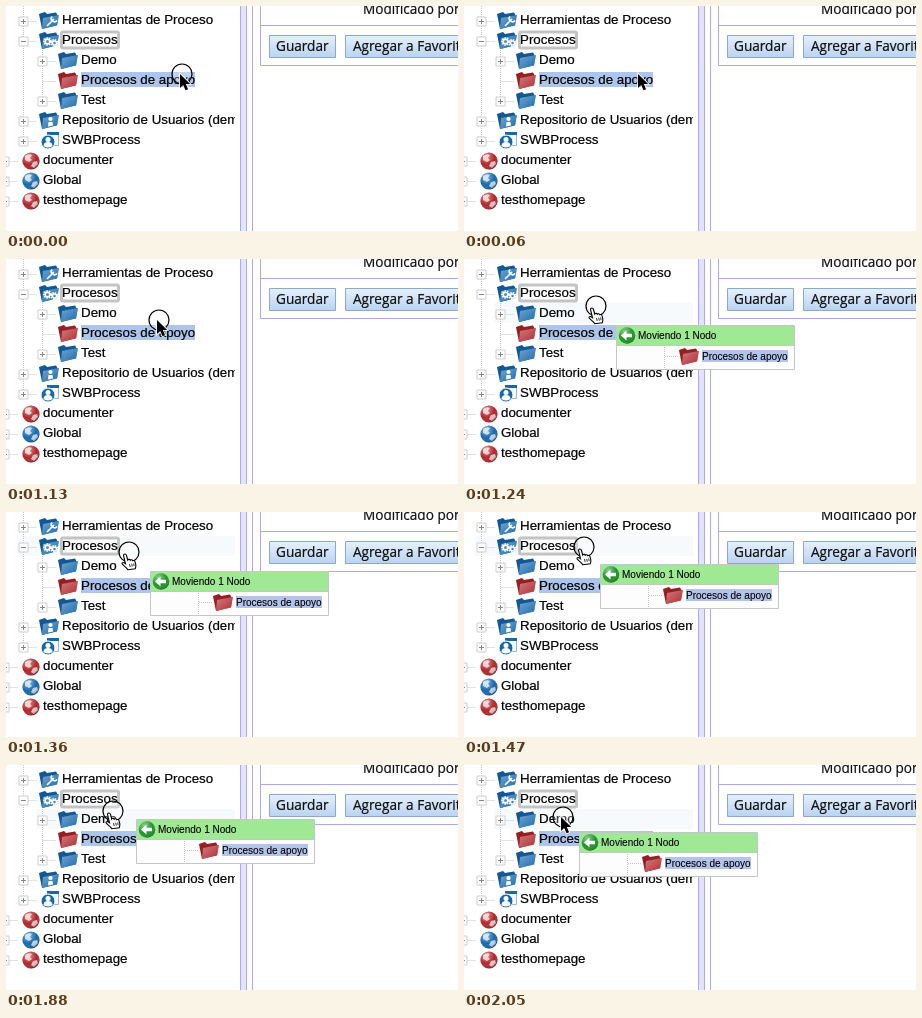
These frames come from a looping animation (452x225 px, 2.88 s). An HTML page:

```html
<!DOCTYPE html>
<html lang="es">
<head>
<meta charset="utf-8">
<title>Mover un nodo</title>
<style>
  html, body { margin: 0; width: 100%; height: 100%; overflow: hidden; background: #fff; }
  svg { display: block; }
  text {
    font: 13.33px "Liberation Sans", Arial, sans-serif;
    fill: #000; stroke: #000; stroke-width: .2; white-space: pre;
  }
  .form text { font: 13.6px "Open Sans", "Noto Sans", sans-serif; fill: #111; }
  .panel text { font-size: 10px; stroke-width: .1; }
  .rule { fill: none; stroke: #a9a9f6; }
  .dots { fill: none; stroke: #c4c4c4; stroke-dasharray: 1 1; }
  .blue { color: #1668ad; }
  .red { color: #b0262b; }
  .mark { fill: none; stroke: #fff; stroke-width: 1.6; }
</style>
</head>
<body>
<svg width="452" height="225" viewBox="0 0 452 225">
  <defs>
    <linearGradient id="face" x2="1" y2="1">
      <stop stop-color="#fff" stop-opacity=".4"/>
      <stop offset="1" stop-color="#fff" stop-opacity=".03"/>
    </linearGradient>
    <radialGradient id="shine" cx=".35" cy=".25" r=".8">
      <stop stop-color="#fff" stop-opacity=".5"/>
      <stop offset=".6" stop-color="#fff" stop-opacity="0"/>
      <stop offset="1" stop-opacity=".3"/>
    </radialGradient>
    <linearGradient id="button" x2="0" y2="1">
      <stop stop-color="#e6f0fc"/>
      <stop offset="1" stop-color="#bad3f0"/>
    </linearGradient>
    <clipPath id="tree"><path d="M0 0H229V225H0z"/></clipPath>

    <g id="folder">
      <path d="M0 3 6 1 8 3 17 1.500 19 5 18 14 3 18z" fill="currentColor"/>
      <path d="M0 3 6 1 8 3 17 1.500 19 5 18 14 3 18z" fill-opacity=".15"/>
      <path d="M4 7 20 4 18 14.500 3 18z" fill="currentColor"/>
      <path d="M4 7 20 4 18 14.500 3 18z" fill="url(#face)"/>
    </g>
    <g id="tool">
      <use href="#folder"/>
      <path class="mark" d="M8 15 15 8M13 5.500a3 3 0 1 0 5 4"/>
    </g>
    <g id="gears">
      <use href="#folder"/>
      <g class="mark" stroke-dasharray="1.500 1"><circle cx="8.500" cy="10.500" r="3.500"/><circle cx="15.500" cy="12" r="3.200"/></g>
      <g class="mark"><circle cx="8.500" cy="10.500" r="2.300"/><circle cx="15.500" cy="12" r="2"/></g>
    </g>
    <g id="users">
      <use href="#folder"/>
      <circle cx="11.500" cy="8" r="2.100" fill="#fff"/>
      <path d="M9 15.500 9.500 11h4l.5 3.500z" fill="#fff"/>
    </g>
    <g id="process">
      <path d="M8.500 1.500h11v13h-11z" fill="#f5f8fc" stroke="#9bb4cf"/>
      <path d="M8 1h12v3H8z" fill="currentColor"/>
      <circle cx="9" cy="11" r="7" fill="currentColor" stroke="#fff"/>
      <circle cx="9" cy="8.500" r="2.500" fill="#fff"/>
      <path d="M4.500 15q0-4 4.500-4t4.500 4q-4.500 3-9 0z" fill="#fff"/>
    </g>
    <g id="globe" transform="translate(1 1)">
      <circle cx="10" cy="9" r="8.600" fill="currentColor"/>
      <path d="M4 4q4-3 7-1l-2 3 2 2-3 2-4-2zM12 10l4-1 1 3-4 4-3-2z" fill="#fff" fill-opacity=".7"/>
      <circle cx="10" cy="9" r="8.600" fill="url(#shine)"/>
    </g>
    <path id="box" d="M-4.500-4.500h9v9h-9z" fill="#fdfdfd" stroke="#cfcfcf"/>
  </defs>

  <rect width="452" height="225" fill="#fff"/>
  <g clip-path="url(#tree)">
    <rect id="hover" height="20" fill="#f7fafd"/>
    <path class="dots" d="M17.500 0V134M36.500 44V94M-1.500 134V194"/>
    <rect x="55.500" y="26" width="57" height="16" rx="1.500" fill="#fff" stroke="#c4c4c4" stroke-width="3"/>
    <rect x="75" y="66" width="114" height="15" fill="#adc5ea"/>
    <g id="rows"></g>
  </g>

  <rect x="234" width="7" height="225" fill="#e1e4fa"/>
  <path class="rule" d="M234.500 0V225M240.500 0V225M246.500 0V225M254.500 0V59.500H452M254.500 19.500H452"/>
  <g class="form">
    <text x="357" y="8">Modificado por</text>
    <g fill="url(#button)" stroke="#8ba9cc">
      <path d="M263.500 29.500h66v22h-66zM339.500 29.500h130v22h-130z"/>
    </g>
    <text x="270" y="45">Guardar</text>
    <text x="347" y="45">Agregar a Favoritos</text>
  </g>

  <g id="panel" class="panel">
    <path d="M.5.5h178v44H.5z" fill="#fdfdfe" stroke="#c3c6ca"/>
    <path d="M1 1h177v19H1z" fill="#a0e994"/>
    <path d="M1 20.500h177" stroke="#bccdb9"/>
    <circle cx="11" cy="10.500" r="8.300" fill="#1f9428"/>
    <circle cx="11" cy="10.500" r="8.300" fill="url(#shine)"/>
    <path d="M5 10.500l5.500-5v3.300H16v3.400h-5.500v3.300z" fill="#fff"/>
    <text x="22" y="14">Moviendo 1 Nodo</text>
    <path class="dots" d="M48.500 22V44M49 31.500H62"/>
    <use href="#folder" class="red" x="63" y="22"/>
    <rect x="86" y="25" width="86" height="12" fill="#b3c3ea"/>
    <text x="86" y="34.500">Procesos de apoyo</text>
  </g>

  <g id="pointer">
    <circle id="ring" r="10" fill="#fff" fill-opacity=".25" stroke="#000" stroke-width="1.200"/>
    <path id="arrow" d="M-2 0v14l3.200-3 2.300 5.300 2.600-1.100-2.300-5.200h4.400z" stroke="#fff" paint-order="stroke" stroke-width="1.600"/>
    <g id="hand" transform="translate(-1 .5)">
      <path d="M-4.500 3c0-2 2.500-2 3 0l1.200 4.500c.6-1 2.200-.8 2.600.2c.7-.8 2.200-.5 2.500.5c.8-.6 2 0 2.200 1l.8 3c.3 1.500-.2 2.500-.5 4l-7.500 1c-1-2-4-3.500-5.500-5.500c-1-1.500.8-2.300 2.200-1.200l1 .7z" fill="#fff" stroke="#000" stroke-width="1.100"/>
      <path d="M1.500 11.500l.7 3M3.700 11.200l.6 3M5.700 11l.4 2.600" stroke="#000" stroke-width=".8"/>
    </g>
  </g>
</svg>
<script>
  const el = id => document.getElementById(id);
  const LOOP = 2880;

  // label, level, icon, colour, expander sign
  const rows = [
    ["Herramientas de Proceso", 1, "tool", "blue", "+"],
    ["Procesos", 1, "gears", "blue", "-"],
    ["Demo", 2, "folder", "blue", "+"],
    ["Procesos de apoyo", 2, "folder", "red", ""],
    ["Test", 2, "folder", "blue", "+"],
    ["Repositorio de Usuarios (demo)", 1, "users", "blue", "+"],
    ["SWBProcess", 1, "process", "blue", "+"],
    ["documenter", 0, "globe", "red", "+"],
    ["Global", 0, "globe", "blue", "+"],
    ["testhomepage", 0, "globe", "red", "+"]
  ];
  el("rows").innerHTML = rows.map(([label, level, icon, colour, sign], i) => {
    const mid = 14 + 20 * i, x = 19 * level - 1.500, y = mid + 1.500;
    const box = sign && `<use href="#box" x="${x}" y="${y}"/>`;
    const signs = { "+": "M-2.500 0h5M0-2.500v5", "-": "M-2.500 0h5", "": "" };
    return `<path class="dots" d="M${x} ${y}h14"/>${box}
      <path d="${signs[sign]}" transform="translate(${x} ${y})" stroke="#888"/>
      <use href="#${icon}" class="${colour}" x="${x + 15.500}" y="${mid - 9}"/>
      <text x="${37 + 19 * level}" y="${mid + 4}">${label}</text>`;
  }).join("");

  // start time, pointer x, pointer y
  const steps = [
    [0, 176, 68], [60, 176, 68], [1020, 173, 68], [1070, 166, 66],
    [1130, 153, 61], [1180, 136, 51], [1240, 132, 47], [1300, 128, 44],
    [1360, 123, 40], [1410, 120, 37], [1470, 120, 35], [1530, 117, 34],
    [1580, 117, 34], [1760, 117, 34], [1820, 114, 39], [1880, 107, 46],
    [1990, 99, 52], [2050, 99, 52]
  ];
  const show = (id, on) => el(id).setAttribute("visibility", on ? "visible" : "hidden");
  const move = (id, x, y) => el(id).setAttribute("transform", `translate(${x} ${y})`);

  function draw(now) {
    const t = now % LOOP;
    const i = steps.findLastIndex(step => step[0] <= t);
    const [, x, y] = steps[i];
    // the dragged panel trails the pointer by one step
    const [, lastX, lastY] = steps[Math.max(0, i - 1)];
    const dragging = t >= 1180;
    const hand = dragging && t < 1990;

    move("pointer", x, y);
    move("panel", lastX + 16, lastY + 15);
    show("ring", t < 60 || t >= 1020);
    show("panel", dragging);
    show("hand", hand);
    show("arrow", !hand);

    const onParent = y < 43, left = onParent ? 11 : 30;
    show("hover", dragging);
    el("hover").setAttribute("x", left);
    el("hover").setAttribute("y", onParent ? 24 : 44);
    el("hover").setAttribute("width", 229 - left);
  }

  function tick() {
    draw(performance.now());
    requestAnimationFrame(tick);
  }
  tick();
</script>
</body>
</html>
```
